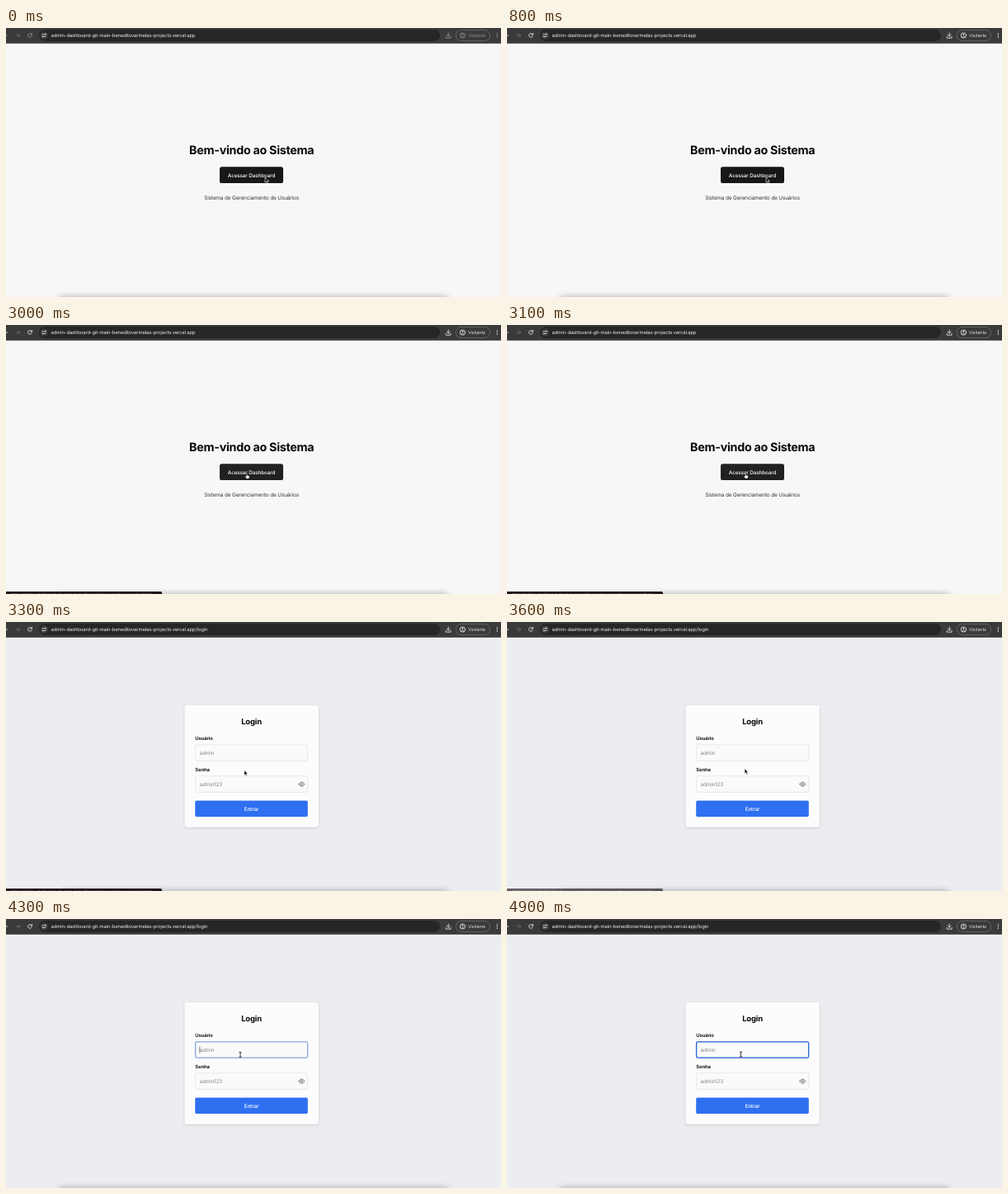
An HTML page for the animation above (5000 ms loop, 600 px wide and 326 px high).

```html
<!DOCTYPE html>
<html lang="pt-BR">
<head>
<meta charset="utf-8">
<style>
  html, body { margin: 0; height: 100%; overflow: hidden; background: #f7f7f7; }
  svg { display: block; width: 100vw; height: 100vh; }
  text { font-family: Inter, Roboto, sans-serif; letter-spacing: -.02em; text-rendering: geometricPrecision; }
  .mid { text-anchor: middle; }
  .bold { font-weight: 700; }
  .line { fill: none; stroke-linecap: round; stroke-linejoin: round; }
  #card { filter: drop-shadow(0 1.2px 1.6px rgba(0, 0, 0, .14)); }
  #dock { filter: blur(3.5px); }
</style>
</head>
<body>
<svg viewBox="0 0 600 326" preserveAspectRatio="none">
  <rect id="page" width="600" height="326"/>

  <g id="home">
    <text class="mid bold" x="297.7" y="153" font-size="14.3" fill="#0a0a0a">Bem-vindo ao Sistema</text>
    <rect id="access" x="259" y="168.3" width="77" height="19.8" rx="2.6"/>
    <text class="mid" x="297.5" y="180.6" font-size="6.35" font-weight="500" fill="#fafafa">Acessar Dashboard</text>
    <text class="mid" x="297.6" y="208.3" font-size="6.42" fill="#333">Sistema de Gerenciamento de Usuários</text>
  </g>

  <g id="login" font-size="6.4">
    <rect id="card" x="216.4" y="101" width="162.4" height="147.8" rx="3.3" fill="#fcfcfd"/>
    <text class="mid bold" x="297.5" y="124.4" font-size="9.5" fill="#0a0a0a">Login</text>
    <g class="bold" font-size="5.9" fill="#171717">
      <text x="229.3" y="143">Usuário</text>
      <text x="229.3" y="181">Senha</text>
    </g>
    <g fill="#fafafb" stroke="#e3e4e8" stroke-width=".8">
      <rect x="229.5" y="148.7" width="136.2" height="19.6" rx="1.6"/>
      <rect x="229.5" y="186.7" width="136.2" height="19.6" rx="1.6"/>
    </g>
    <rect id="focus" x="229.6" y="148.8" width="136" height="19.4" rx="1.7" fill="none" stroke="#2563d4" stroke-width="1.3"/>
    <rect id="caret" x="234.6" y="154.5" width=".6" height="8" fill="#222"/>
    <g fill="#85878c">
      <text x="234.5" y="160.8">admin</text>
      <text x="234.5" y="198.8">admin123</text>
    </g>
    <g class="line" stroke="#5c6068" stroke-width=".8">
      <path d="M354.9 196.6Q358.4 191 361.9 196.6Q358.4 202.2 354.9 196.6Z"/>
      <circle cx="358.4" cy="196.6" r="1.2"/>
    </g>
    <rect x="229.2" y="216.4" width="136.6" height="19.6" rx="1.7" fill="#2f70f1"/>
    <text class="mid" x="297.5" y="228.5" font-weight="500" fill="#fff">Entrar</text>
  </g>

  <rect id="dock" x="62" y="325" width="476" height="20" rx="8" fill="#000" opacity=".26"/>

  <g id="status">
    <rect x="-4" y="323" width="193" height="9" rx="1.5" fill="#1d161b"/>
    <text x="6" y="328.2" font-size="4.8" fill="#94858d">https://admin-dashboard-git-main-beneditovarmelas-projects.vercel.app/login</text>
  </g>

  <rect width="600" height="18.5" fill="#3b3a3b"/>
  <rect y="18" width="600" height=".7" fill="#4b4345"/>
  <rect x="40" y="2" width="486" height="14" rx="7" fill="#272627"/>
  <circle cx="46.3" cy="9" r="4.8" fill="#3b3a3b"/>
  <g class="line" stroke="#ddd" stroke-width=".8">
    <path d="M44 7.7h2M48.2 10.4h-2"/>
    <circle cx="47.7" cy="7.7" r=".8"/>
    <circle cx="44.8" cy="10.4" r=".8"/>
  </g>
  <text id="url" x="54.6" y="11" font-size="5.85" fill="#ececec"></text>
  <path class="line" d="M12 9h4.6M14.5 6.8L16.7 9L14.5 11.2" stroke="#757475" stroke-width=".8"/>
  <rect x="545.3" y="2.4" width="41.4" height="13.2" rx="6.6" fill="none" stroke="#767576" stroke-width=".7"/>
  <g id="tools" color="#dedede">
    <g class="line" stroke="currentColor" stroke-width=".9">
      <path d="M0 9h1.6"/>
      <path d="M31.1 7.7A2.4 2.4 0 1 0 31.3 9.7M31.5 6.3V8.1H29.7"/>
      <path d="M536.2 6V10M534.2 8.2L536.2 10.2L538.2 8.2M533.3 10.4V12.2H539.1V10.4"/>
      <circle cx="553.4" cy="9" r="3.2"/>
      <path d="M551.4 11.2Q553.4 9.6 555.4 11.2"/>
    </g>
    <g fill="currentColor">
      <circle cx="553.4" cy="8" r="1.1"/>
      <circle cx="595.4" cy="6.7" r=".75"/>
      <circle cx="595.4" cy="9" r=".75"/>
      <circle cx="595.4" cy="11.3" r=".75"/>
      <text x="560" y="11" font-size="5.4">Visitante</text>
    </g>
  </g>

  <g id="cursor">
    <path id="arrow" d="M0 0V6.1L1.4 4.9L2.4 7.2L3.5 6.7L2.5 4.5H4.4Z" fill="#000" stroke="#fff" stroke-width=".6"/>
    <path id="hand" d="M-.6 .6Q0 -.4 .7 .6V2.6L2.6 3.1Q3.3 3.4 3.1 4.2L2.6 6.6H-.5L-2.3 4Q-1.8 3 -.6 3.9Z" fill="#fff" stroke="#111" stroke-width=".5"/>
    <path id="beam" class="line" d="M-1.2 -3.2Q0 -3.2 0 -2.3V2.3Q0 3.2 -1.2 3.2M1.2 -3.2Q0 -3.2 0 -2.3M0 2.3Q0 3.2 1.2 3.2" stroke="#111" stroke-width=".8"/>
  </g>
</svg>
<script>
const LOOP = 5000, STEP = 100;
const $ = id => document.getElementById(id);
const show = (id, on) => $(id).setAttribute('opacity', +on);
const ramp = (t, from, to) => Math.min(1, Math.max(0, (t - from) / (to - from)));

// Pointer track: time, x, y
const track = [
  [0, 314, 181], [2600, 314, 181], [2700, 313.8, 180.4], [2800, 309, 180.2],
  [2900, 300, 179.8], [3000, 292, 179.6], [3100, 289.3, 179.4], [3300, 288.8, 179.6],
  [3800, 287.6, 176.4], [3900, 300, 221], [4000, 294, 196], [4100, 284, 164.3],
  [4500, 284, 164.3], [4700, 283.7, 163.8], [4800, 283.7, 163.8], [4900, 283.5, 164]
];

function pointer(t) {
  const i = track.findIndex(k => k[0] > t);
  if (i < 0) return track[track.length - 1].slice(1);
  const [a, b] = [track[i - 1], track[i]], p = ramp(t, a[0], b[0]);
  return [1, 2].map(n => a[n] + (b[n] - a[n]) * p);
}

function draw(now) {
  const t = Math.floor(now % LOOP / STEP) * STEP;
  const onLogin = t >= 3300, hover = t >= 2700 && !onLogin, typing = t >= 4100;

  $('page').setAttribute('fill', onLogin ? '#ecedf0' : '#f7f7f7');
  $('access').setAttribute('fill', hover ? '#212121' : '#171717');
  $('url').textContent = 'admin-dashboard-git-main-beneditovarmelas-projects.vercel.app' + (onLogin ? '/login' : '');
  show('home', !onLogin);
  show('login', onLogin);
  show('tools', t < 800 ? .5 : 1);
  show('status', ramp(t, 2700, 2900) - ramp(t, 3500, 3800));
  show('focus', ramp(t, 4200, 4400));
  show('caret', t >= 4300 && t < 4900);

  $('cursor').setAttribute('transform', `translate(${pointer(t)})`);
  show('hand', hover);
  show('beam', typing);
  show('arrow', !hover && !typing);
}

const start = performance.now();
(function tick() {
  draw(performance.now() - start);
  requestAnimationFrame(tick);
})();
</script>
</body>
</html>
```
